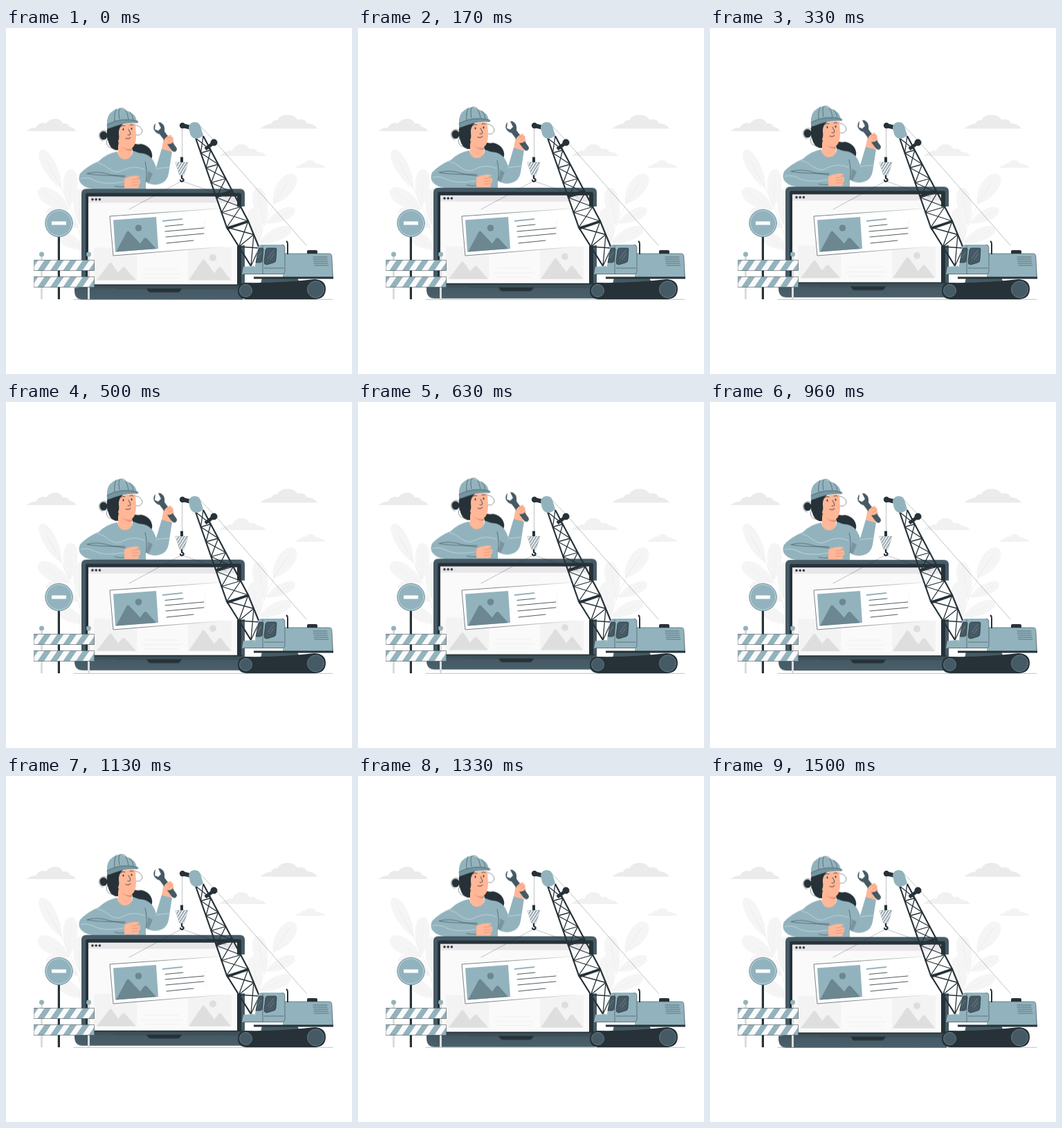
Animation of 500x500 px, one loop 1540 ms. Source, as an HTML page:

```html
<!DOCTYPE html>
<html lang="en">
<head>
<meta charset="utf-8">
<title>Under construction</title>
<style>
  html, body { margin: 0; width: 100%; height: 100%; overflow: hidden; background: #fff; }
  svg { display: block; width: 100vw; height: 100vh; }
  .t { fill: #92b3bd; } .d { fill: #263238; } .s { fill: #455a64; } .w { fill: #fff; } .k { fill: #ffb797; }
  .ln { fill: none; stroke: #263238; stroke-width: .5; stroke-linecap: round; stroke-linejoin: round; }
  .lt { fill: none; stroke: #d3e1e5; stroke-width: .7; stroke-linecap: round; }
  .thin { stroke-width: .3; } .bold { stroke-width: .8; }
  .slate { stroke: #607d8b; } .warm { stroke: #c77b62; }
</style>
</head>
<body>
<svg viewBox="0 0 500 500">
  <defs>
    <linearGradient id="base" x1="0" y1="0" x2="0" y2="1">
      <stop offset="0" stop-color="#37474f"/><stop offset=".35" stop-color="#455a64"/><stop offset="1" stop-color="#4a606b"/>
    </linearGradient>
    <linearGradient id="edge" gradientUnits="userSpaceOnUse" x1="200" y1="0" x2="315" y2="0">
      <stop offset="0" stop-color="#263238"/><stop offset="1" stop-color="#263238" stop-opacity=".1"/>
    </linearGradient>
    <clipPath id="b1"><path d="M40.500 335.500h87v15h-87z"/></clipPath>
    <clipPath id="b2"><path d="M40.500 359.500h87v15h-87z"/></clipPath>
    <clipPath id="block"><path d="M245 194h18l-5.500 18q-3.500 5-7 0z"/></clipPath>
  </defs>

  <!-- clouds -->
  <g fill="#ebebeb">
    <path d="M30 149q5-5 13-5 3-6 9-7 4 0 6 1 5-7 13-7 8 0 11 7 8-1 10 5 7 1 9 6z"/>
    <path d="M368 145.500q5-6 15-7 3-6 9-5 4-8 15-8 10 0 14 7 10-2 14 5 11 1 15 8z"/>
    <path d="M308 185q4-5 11-6 4-3 8-2 4-9 13-9 9 0 12 7 8-2 11 4 9 0 13 6z" fill="#f1f1f1"/>
    <path d="M418 202q3-4 8-4 2-4 6-3 3-4 8-4 6 0 8 5 5-1 7 2 5 0 7 4z" fill="#f3f3f3"/>
  </g>

  <g id="plants"></g>
  <path d="M98 392.300H472" class="ln thin"/>

  <g id="rig">
    <!-- worker -->
    <path d="M180 164q8 5 15 3 10 2 14 9 4 7 1 13-6-1-12-3-6-6-15-9z" class="d"/>
    <path d="M147 140q-3 18 1 24 2 9 10 12h10V138z" class="d"/>
    <ellipse cx="141" cy="155" rx="5.500" ry="6.200" class="d"/>
    <path d="M147 149q-8-4-12 3-2 8 5 11M187 140q9 1 10 9-2 7-9 5M147 159q-4 7 1 12 6 4 12 3" class="ln"/>
    <path d="M162 166v15q1 12 11 11 9-1 9-12v-10z" class="k"/>
    <path d="M166 170q7 6 16 4v3q-8 1-16-7z" fill="#ed8f70"/>
    <path d="M162 142q12-6 25-4l1 17q0 16-8 19-9 1-17-8-3-5-3-11z" class="k"/>
    <path d="M148 142l22-5q-8 7-7 16 1 6-1 10 2 7-3 11-7 1-11-10z" class="d"/>
    <path d="M166 142q3-3 6-1M179 140q3-2 5 0M177 146q3 5 3 7-1 2-4 1M173 159q4 2 7-1" class="ln bold"/>
    <path d="M173 159q4 1 7-2-2 5-7 2z" fill="#b24a45"/>
    <ellipse cx="169.500" cy="146" rx="1" ry="1.600" class="d"/>
    <ellipse cx="181.500" cy="145" rx="1" ry="1.600" class="d"/>
    <path d="M146 139q-1-14 9-20l4-2q7-3 13 1l5 2q11 4 12 15-20-2-43 4z" class="t"/>
    <path d="M146 139q21-11 44-5 3 1 0 3-18-2-42 8-3-2-2-6z" fill="#7596a0"/>
    <path d="M157 134q-1-10 2-17M164 131q-2-10 0-15 5-2 8 1 4 6 5 14M179 121q5 5 5 11M146 139q21-11 44-5" class="ln"/>

    <path d="M161 178q-16 3-27 14-17 7-27 18-4 9 2 15 6 6 16 7h77v-10q10 6 20 3 11-3 13-15l5-32-15-4-8 27q-5-17-18-20-9-1-16-4 0 10-9 12-11 2-13-11z" class="t"/>
    <path d="M201 193q4 15 1 29" class="ln"/>
    <path d="M202 220q4-8 3-14l7 4-6 14z" fill="#78959f"/>
    <path d="M117 210q15-5 35 2l20 3M118 210q12 3 54 3M157 228q8 2 15 1" class="ln"/>
    <path d="M132 194q9 2 17 9 11 8 20 2 16-8 31-1M108 217q10-3 20 3 14 7 42 2M217 203q10-2 19-2" class="lt"/>
    <path d="M171 217q9-4 17-4 6 0 5 2l-5 1q7 1 6 4 1 4-2 6 1 5-3 5h-18z" class="k"/>
    <path d="M182 219l10-1M182 223l10-1M182 227l9-1" class="ln warm"/>
    <path d="M225 174l3-15q3-6 6-4l7 5q3 5 1 9l-4 9z" class="k"/>
    <path d="M216 137q-4 5-2 10 3 5 8 6l18 24q4 3 6 0 2-2 0-5l-17-23q1-8-3-11-3-3-6-2l4 8-4 4-5-2z" class="s"/>
    <path d="M229 156l9 14" class="ln"/>
    <path d="M229 160q4-5 9-6 3 1 0 3 4-1 4 2l-2 2q3 1 2 3l-4 3-9 1z" class="k"/>
    <path d="M233 159l6-2M235 163l6-3" class="ln warm"/>

    <!-- laptop -->
    <path d="M109 376V239q0-7 7-7h222q7 0 7 7v137z" class="s"/>
    <path d="M115 372V241q0-3 3-3h219q3 0 3 3v131z" class="d"/>
    <path d="M119 243h215v127H119z" fill="#fafafa"/>
    <path d="M119 243h215v9H119z" fill="#e8e6e9"/>
    <g class="d"><circle cx="125" cy="247.300" r="1.700"/><circle cx="130.200" cy="247.300" r="1.700"/><circle cx="135.400" cy="247.300" r="1.700"/></g>
    <path d="M127 317h62v47h-62zM263 317h63v47h-63z" fill="#f3f3f3"/>
    <path d="M131 364l18-24q2-3 4 0l9 13 6-7q2-2 4 0l16 18zM264 364l19-28q2-4 5 0l13 18 6-8q2-2 4 0l14 18z" fill="#dedede"/>
    <circle cx="299" cy="331.500" r="5" fill="#dedede"/>
    <path d="M201 348h48M196 355h58M201 361h48" stroke="#efefef"/>
    <path d="M99 375q12-1 14-5h229v22H111q-12 0-12-13z" fill="url(#base)"/>
    <path d="M112 370h230v1.500H112z" class="d"/>
    <path d="M160 376H340" class="ln thin"/>
    <path d="M203 376h51l-2 3q-1 2.500-4 2.500h-39q-3 0-4-2.500z" class="d"/>
  </g>

  <!-- lifted card -->
  <path d="M150 272l198-14.500 4 56L155 329z" class="w"/>
  <path d="M313 260.500L150 272l5 57 160-13" fill="none" stroke="url(#edge)" stroke-width=".6"/>
  <path d="M155 277.500l62-4.500 3 46-62 4.500z" class="t"/>
  <path d="M159 323.500l15-28q2-4 5 0l15 16 5-7q2-3 5 0l13 14.500z" fill="#6c8790"/>
  <circle cx="191.500" cy="289" r="4.800" fill="#6c8790"/>
  <path d="M226 279l29-3" stroke="#92b3bd" stroke-width="2"/>
  <path d="M230 286.500l26-2.500M230 294l56-5M231 302l55-5M232 311l39-4" class="ln bold"/>
  <path d="M287 278l3 29" stroke="#ececec" stroke-dasharray="2 2" fill="none"/>
  <path d="M178 262l76-41 64 23M254.500 143v46" class="ln thin"/>

  <!-- hook -->
  <path d="M252 186.500h4v8h-4z" class="d"/>
  <path d="M245 194h18l-5.500 18q-3.500 5-7 0z" fill="#eee"/>
  <path id="hatch" clip-path="url(#block)" stroke="#8da0a7" stroke-width="1.500"/>
  <path d="M245 194h18l-5.500 18q-3.500 5-7 0z" class="ln slate thin"/>
  <path d="M254 214v3q4 2 2 4-3 2-4-1" fill="none" stroke="#263238" stroke-width="2.300" stroke-linecap="round"/>

  <!-- crane -->
  <path d="M280 141l22 23L434 314" class="ln thin"/>
  <path d="M255 141l13 3" stroke="#263238" stroke-width="6"/>
  <circle cx="255" cy="141" r="4.200" class="d"/>
  <path d="M288 175l12-9" stroke="#263238" stroke-width="5"/>
  <circle cx="300.500" cy="165.500" r="5" class="d"/>
  <path id="braces" fill="none" stroke="#263238" stroke-width="1.300"/>
  <path id="rails" fill="none" stroke="#263238" stroke-width="2.200"/>
  <path d="M304 243l24-8M319 290l32-11" stroke="#263238" stroke-width="3.500"/>
  <path d="M264 144q1-8 9-8 6 0 8 6l4 13q-5 5-11 5-6-1-8-7z" class="t"/>

  <path d="M370 361h51l4 9h-57z" class="s"/>
  <path d="M346 368q50 1 100-5 16 1 16 14 0 14-15 15H347q-12-1-12-12t11-12z" class="d"/>
  <circle cx="346.500" cy="379.500" r="9" class="s" stroke="#78909c" stroke-width=".7"/>
  <circle cx="447.500" cy="377.800" r="12" class="s" stroke="#78909c" stroke-width=".7"/>
  <path d="M400 326h67q4 0 4 5l2 30h-73z" class="t"/>
  <path d="M358 359.500h115v3H358z" class="d"/>
  <path d="M343 345l16-1 4 12h-22z" class="t"/>
  <path d="M358 356l6-38q1-5 6-5h29q4 0 4 4v35q0 4-4 4z" class="t"/>
  <path d="M399 313.500q4 0 4 4v34q0 4-4 4h-56M371 315v40M403 326h64q4 0 4 5l1 28M373 347h28" class="ln"/>
  <path d="M365 320q0-2 2-2h3q2 0 2 2l-2 17q-1 2-3 2h-6z" class="s" stroke="#263238" stroke-width=".7"/>
  <path d="M378 318h11q2 0 2 2l-1 15q0 3-3 4l-10 3q-4 0-4-4l2-17q1-3 3-3z" class="s" stroke="#263238" stroke-width=".7"/>
  <path d="M378 333l9-12M381 335l7-9M363 333l6-9" stroke="#78909c" stroke-width=".7"/>
  <path d="M407 327v-15q0-3-2-4" fill="none" stroke="#263238" stroke-width="2"/>
  <path d="M435 326v-3q0-2 2-2h11q2 0 2 2v3z" class="d"/>
  <path d="M444 331h20M444 334h20M445 337h20M445 340h20M446 343h20" class="ln"/>

  <!-- sign and barrier -->
  <path d="M74.800 301h3.200v91h-3.200z" class="d"/>
  <circle cx="76.500" cy="282" r="20" class="t"/>
  <circle cx="76.500" cy="282" r="18.200" class="lt"/>
  <circle cx="76.500" cy="282" r="19.800" class="ln slate"/>
  <path d="M66 279.500h21v5H66z" class="w"/>
  <path d="M51.500 329v63M119.500 329v63" stroke="#dcdcdc" stroke-width="3"/>
  <circle cx="51.500" cy="327" r="3.500" class="t"/><circle cx="119.500" cy="327" r="3.500" class="t"/>
  <path d="M40.500 335.500h87v15h-87zM40.500 359.500h87v15h-87z" fill="#fafafa"/>
  <path id="s1" clip-path="url(#b1)" class="t"/>
  <path id="s2" clip-path="url(#b2)" class="t"/>
  <path d="M40.500 335.500h87v15h-87zM40.500 359.500h87v15h-87z" class="ln"/>
</svg>
<script>
const $ = id => document.getElementById(id);
const setPath = (id, d) => $(id).setAttribute('d', d);
const range = (n, f) => Array.from({ length: n }, (_, i) => f(i)).join('');

// Barrier stripes and hook hatching
const stripes = y => range(6, i => `M${26.500 + i * 18.500} ${y}h9.500l11-16h-9.500z`);
setPath('s1', stripes(351));
setPath('s2', stripes(375));
setPath('hatch', range(9, i => `M${236 + i * 4} 216l14-22`));

// Lattice boom: two bent rails with crossed braces in each section
const left = [[274, 159], [319, 288], [354, 344]];
const right = [[285, 156], [350, 279], [366, 318]];
const mix = (line, s, u) => [0, 1].map(k => line[s][k] + (line[s + 1][k] - line[s][k]) * u);
const section = (s, n) => range(n, i => {
  const [u, v] = [i / n, (i + 1) / n];
  const a = mix(left, s, u), b = mix(right, s, u);
  const c = mix(left, s, v), d = mix(right, s, v);
  return `M${a}L${d}M${b}L${c}L${d}`;
});
setPath('rails', [left, right].map(l => 'M' + l.join('L')).join(''));
setPath('braces', section(0, 6) + section(1, 2));

// Background plants: [x, y, length, width, angle]
const leaf = ([x, y, len, w, deg]) =>
  `<g transform="translate(${x} ${y}) rotate(${deg})">
    <path d="M0 0C${-w} ${-len * .3} ${-w} ${-len} 0 ${-len}S${w} ${-len * .3} 0 0" fill="#f5f5f5"/>
    <path d="M0 0V${-len * .85}" stroke="#ebebeb" stroke-width=".5"/></g>`;
const stem = d => `<path d="${d}" fill="none" stroke="#ebebeb" stroke-width=".7"/>`;
$('plants').innerHTML = [
  [80, 232, 63, 13, -28], [92, 262, 53, 15, -58], [92, 258, 54, 14, 2],
  [105, 288, 52, 15, -62], [106, 284, 52, 13, 2], [112, 320, 44, 13, -58],
  [386, 254, 52, 16, 36], [373, 285, 55, 14, -10], [376, 282, 46, 11, 64],
  [364, 312, 52, 14, -8], [366, 310, 50, 12, 66]
].map(leaf).join('') + stem('M60 195Q100 260 116 330') + stem('M408 222Q372 270 358 335');

// The laptop and worker bob up and back at constant speed
const pose = (ms, y) => ({ transform: `translate(0px, ${y}px)`, offset: ms / 1540 });
$('rig').animate(
  [pose(0, .4), pose(710, -6.2), pose(1460, .8), pose(1540, .4)],
  { duration: 1540, iterations: Infinity, easing: 'linear' }
);
</script>
</body>
</html>
```
